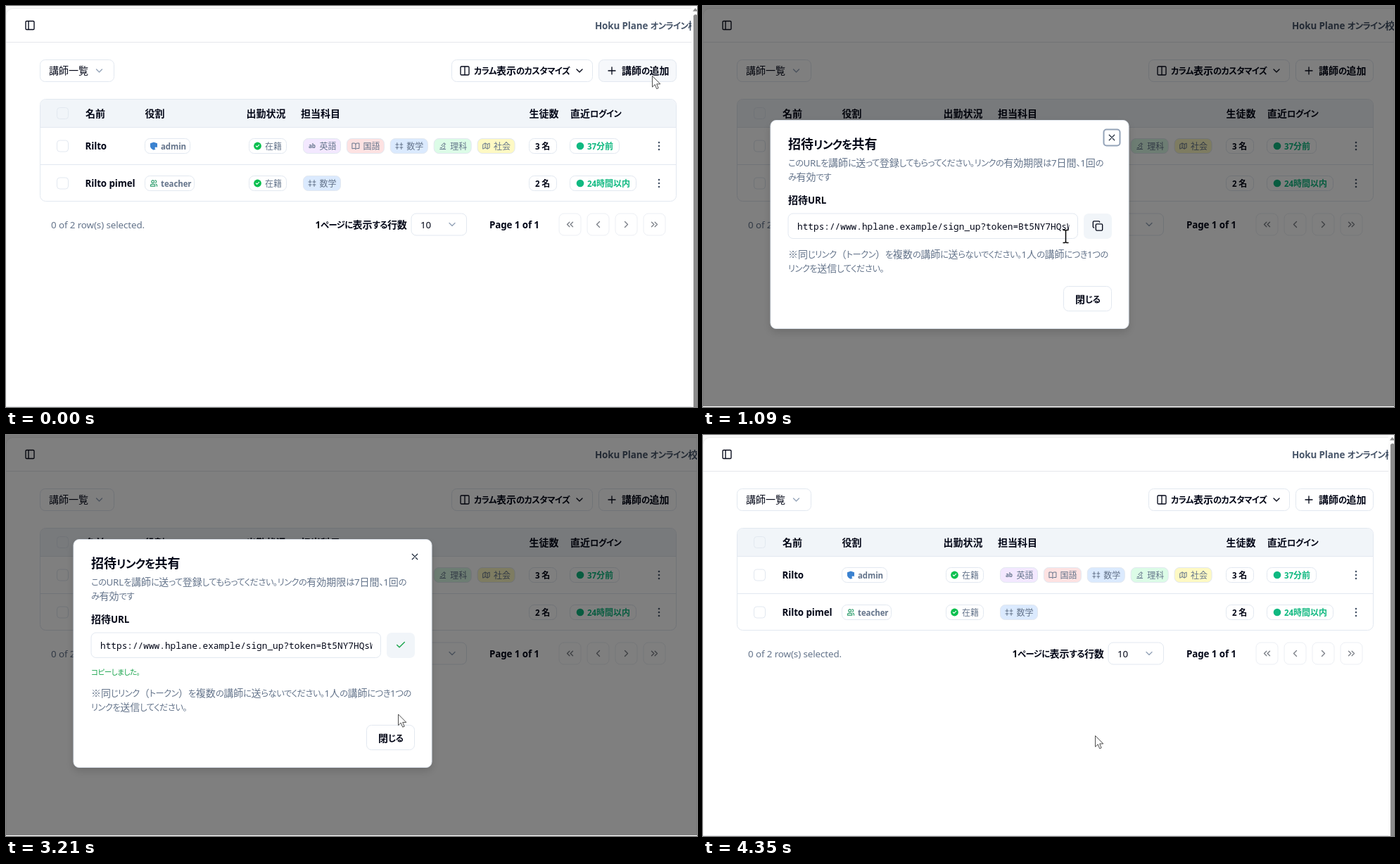
An HTML page for the animation above (4.74 s loop, 982 px wide and 570 px high).

```html
<!DOCTYPE html>
<html lang="ja">
<head>
<meta charset="utf-8">
<title>講師一覧</title>
<style>
html, body { margin: 0; width: 100%; height: 100%; overflow: hidden; background: #fff; }
svg { display: block; width: 100vw; height: 100vh; }
text { font-family: "Noto Sans CJK JP", "Noto Sans CJK", sans-serif; }
.latin { font-family: "Noto Sans", "Open Sans", sans-serif; font-size: .957em; letter-spacing: -.008em; }
.kana { font-size: .88em; font-feature-settings: "palt"; letter-spacing: -.045em; }
.mono { font-family: "Noto Sans Mono", "DejaVu Sans Mono", monospace; font-size: 12.77px; }
</style>
</head>
<body>
<svg id="stage" viewBox="0 0 982 570" xmlns="http://www.w3.org/2000/svg"></svg>
<script>
const LOOP = 4740;
const INK = '#020617', SLATE = '#64748b', LINE = '#e2e8f0', PALE = '#f1f5f9', MINT = '#10b981';

const ICONS = {
  down: 'M6 9l6 6 6-6',
  left: 'M15 18l-6-6 6-6',
  right: 'M9 18l6-6-6-6',
  first: 'M11 17l-5-5 5-5M18 17l-5-5 5-5',
  last: 'M6 17l5-5-5-5M13 17l5-5-5-5',
  plus: 'M4.500 12h15M12 4.500v15',
  cross: 'M18 6L6 18M6 6l12 12',
  check: 'M20 6L9 17l-5-5',
  panel: 'M5 3h14a2 2 0 0 1 2 2v14a2 2 0 0 1-2 2H5a2 2 0 0 1-2-2V5a2 2 0 0 1 2-2zM9 3v18',
  columns: 'M5 3h14a2 2 0 0 1 2 2v14a2 2 0 0 1-2 2H5a2 2 0 0 1-2-2V5a2 2 0 0 1 2-2zM12 3v18',
  copy: 'M10 8h10a2 2 0 0 1 2 2v10a2 2 0 0 1-2 2H10a2 2 0 0 1-2-2V10a2 2 0 0 1 2-2zM4 16a2 2 0 0 1-2-2V4a2 2 0 0 1 2-2h10a2 2 0 0 1 2 2',
  book: 'M12 6v14M2 19V4h6a4 4 0 0 1 4 3 4 4 0 0 1 4-3h6v15h-7l-3 2-3-2z',
  math: 'M2 8h8M6 3v8M14 8h8M18 3v8M2 16h8M6 14v7M14 16h8M18 14v7',
  scope: 'M4 21h16M5 17h5M9 11l3 3 6-6-3-3zM16 3l4 4M13 21a6 6 0 0 0 4-9',
  map: 'M3 7l6-3 6 3 6-3v13l-6 3-6-3-6 3zM9 4v13M15 7v13',
  users: 'M9 3a4 4 0 1 0 .1 0zM2 21v-2a4 4 0 0 1 4-4h6a4 4 0 0 1 4 4v2zM16 3a4 4 0 0 1 0 8M22 21v-2a4 4 0 0 0-3-4'
};

// Latin, kana and kanji runs are set separately, kana narrower
const runs = s => s.match(/[\x20-\x7e]+|[\u3001-\u30ff]+|[^\x20-\x7e\u3001-\u30ff]+/g).map(r =>
  /^[\x20-\x7e]/.test(r) ? `<tspan class="latin">${r}</tspan>` :
  /^[\u3001-\u30ff]/.test(r) ? `<tspan class="kana">${r}</tspan>` : `<tspan>${r}</tspan>`).join('');

const label = (x, y, s, { size = 14, fill = INK, weight = 400, anchor = 'start' } = {}) =>
  `<text x="${x}" y="${y}" font-size="${size}" fill="${fill}" font-weight="${weight}" text-anchor="${anchor}">${runs(s)}</text>`;

const box = (x, y, w, h, r, fill = '#fff', stroke = LINE, sw = 1, extra = '') =>
  `<rect x="${x}" y="${y}" width="${w}" height="${h}" rx="${r}" fill="${fill}" stroke="${stroke}" stroke-width="${sw}" ${extra}/>`;

const dot = (x, y, r, fill, extra = '') => `<circle cx="${x}" cy="${y}" r="${r}" fill="${fill}" ${extra}/>`;

const icon = (name, cx, cy, size = 16, stroke = INK, sw = 2) =>
  `<path d="${ICONS[name]}" transform="translate(${cx - size / 2} ${cy - size / 2}) scale(${size / 24})" ` +
  `fill="none" stroke="${stroke}" stroke-width="${sw}" stroke-linecap="round" stroke-linejoin="round"/>`;

const rule = (y, x1, x2, color = LINE) => `<path d="M${x1} ${y}H${x2}" stroke="${color}"/>`;

const bold = { weight: 600 };
const small = fill => ({ size: 12, weight: 600, fill });

const SUBJECTS = [
  ['英語', '#f3e8ff', ''], ['国語', '#fee2e2', 'book'], ['数学', '#dbeafe', 'math'],
  ['理科', '#dcfce7', 'scope'], ['社会', '#fef9c3', 'map']
];

function subject([name, fill, art], x, cy) {
  const mark = art ? icon(art, x + 13, cy, 12, SLATE, 2)
    : label(x + 13, cy + 3, 'ab', { size: 8.5, weight: 700, fill: SLATE, anchor: 'middle' });
  return box(x + .5, cy - 10.5, 53, 21, 7, fill) + mark +
    label(x + 23.5, cy + 4.5, name, { size: 12, weight: 500, fill: SLATE });
}

function row(cy, name, role, subjects, pupils, login, loginW) {
  const admin = role === 'admin';
  const shield = `<path d="M210 ${cy - 5.5}l5 1.700v4c0 2.500-2 4.500-5 5.500-3-1-5-3-5-5.500v-4z" fill="#3b82d0"/>` + dot(213, cy + 3, 1.5, '#fff');
  return box(72.5, cy - 8, 16, 16, 4) +
    label(112.5, cy + 5, name, bold) +
    box(197.5, cy - 10.5, admin ? 64 : 70, 21, 7) +
    (admin ? shield : icon('users', 210, cy, 11, '#2f9e6e', 2.5)) +
    label(220, cy + 4.5, role, small(SLATE)) +
    box(345.5, cy - 10.5, 53, 21, 7) + dot(357.5, cy, 5.4, '#0ac04f') + icon('check', 357.5, cy, 6.5, '#fff', 4) +
    label(368, cy + 4.5, '在籍', { size: 12, weight: 500, fill: SLATE }) +
    subjects.map((s, i) => subject(s, 422 + i * 61.9, cy)).join('') +
    box(743.5, cy - 10.5, 39, 21, 7) + label(752, cy + 4.5, pupils, small(INK)) +
    box(801.5, cy - 10.5, loginW, 21, 7) + dot(816, cy, 5.3, MINT) + label(826, cy + 4.5, login, small(MINT)) +
    [-5, 0, 5].map(d => dot(928, cy + d, 1.35, '#475569')).join('');
}

const page = () =>
  '<rect width="982" height="570" fill="#f8f8f8"/>' +
  '<path d="M0 570V13a10 10 0 0 1 10-9.500H982V570z" fill="#fff" stroke="#ededed"/>' +
  icon('panel', 34, 27.5) + rule(51.5, 0, 982, '#e5e7eb') +
  label(837, 33, 'Hoku Plane オンライン校', { weight: 600, fill: '#475569' }) +
  box(48.5, 76.5, 105, 31, 7) + label(61, 97, '講師一覧') + icon('down', 132.5, 92, 16, '#94a3b8') +
  box(633.5, 76.5, 200, 31, 7) + icon('columns', 652, 92) + label(665, 97, 'カラム表示のカスタマイズ', bold) + icon('down', 815, 92) +
  box(842.5, 76.5, 110, 31, 7, '#fff', LINE, 1, 'id="add"') + icon('plus', 861, 92) + label(875, 97, '講師の追加', bold) +
  box(48.5, 132.5, 904, 145, 8) +
  `<path d="M49 172V140.500a7.500 7.500 0 0 1 7.500-7.500H944.500a7.500 7.500 0 0 1 7.500 7.500V172z" fill="${PALE}"/>` +
  rule(172.5, 49, 952) + rule(225.5, 49, 952) +
  box(72.5, 144.5, 16, 16, 4, 'none') +
  [[113, '名前'], [197.5, '役割'], [341.5, '出勤状況'], [419, '担当科目'], [743.5, '生徒数'], [802, '直近ログイン']]
    .map(([x, s]) => label(x, 158, s, bold)).join('') +
  row(199, 'Rilto', 'admin', SUBJECTS, '3 名', '37分前', 70) +
  row(252, 'Rilto pimel', 'teacher', [SUBJECTS[2]], '2 名', '24時間以内', 94) +
  label(64, 316, '0 of 2 row(s) selected.', { fill: SLATE }) +
  label(439.5, 316, '1ページに表示する行数', bold) +
  box(576, 295, 78.5, 31, 7) + label(589, 316, '10') + icon('down', 634, 310.5, 16, '#94a3b8') +
  label(687, 316, 'Page 1 of 1', bold) +
  ['first', 'left', 'right', 'last'].map((n, i) =>
    box(786 + i * 40, 295, 31, 31, 7, '#fff', '#eceff4') + icon(n, 801.5 + i * 40, 310.5, 16, '#7c8088')).join('') +
  rule(569.5, 0, 982, '#e5e7eb');

const scrollbar = '<g id="bar"><rect x="974" width="8" height="570" fill="#fcfcfc"/>' +
  '<path d="M977 570V16a3 3 0 0 1 5-3V570z" fill="#8b8b8b"/><path d="M976 7.500l3.500-4.500 2.500 3v1.500z" fill="#8b8b8b"/></g>';

const closeX = y => box(569.5, y - 11.5, 23, 23, 4, 'none', '#94a3b8', 2, 'class="ring"') + icon('cross', 581, y, 15, '#1e293b', 1.9);

const panel = (y, h, id) => box(96, y, 509, h, 8, '#fff', LINE, 1, `id="${id}" filter="url(#shade)"`);

const loading = '<g id="loading">' + panel(191, 239, 'wait') +
  label(121, 231.5, '読み込み中', { size: 18, weight: 600 }) +
  label(121, 257, 'データを読み込んでいます...', { fill: SLATE }) + closeX(216) +
  '<path id="spin" d="M12 0A12 12 0 1 1 3.700-11.400" fill="none" stroke="#020617" stroke-width="2.700" stroke-linecap="round"/>' +
  label(350.5, 363.5, 'Loading...', { size: 16, anchor: 'middle' }) + '</g>';

const invite = '<g id="invite">' + panel(162.5, 296, 'sheet') +
  '<g id="upper">' +
  label(121, 203, '招待リンクを共有', { size: 18, weight: 600 }) + closeX(187) +
  label(121, 228, 'このURLを講師に送って登録してもらってください。リンクの有効期限は7日間、1回の', { fill: SLATE }) +
  label(121, 248, 'み有効です', { fill: SLATE }) +
  label(121, 281, '招待URL', bold) +
  box(121, 295, 411.5, 35.5, 7) +
  '<g clip-path="url(#field)"><text class="mono" x="134" y="318" fill="#020617">https://www.hplane.example/sign_up?token=Bt5NY7HQsW</text></g>' +
  box(541, 295, 40, 36, 7, PALE, 'none') +
  `<g id="copy">${icon('copy', 561, 312.5)}</g><g id="done">${icon('check', 561, 312.5, 16, '#16a34a')}` +
  label(121, 355, 'コピーしました。', { size: 12, weight: 500, fill: '#16a34a' }) + '</g></g>' +
  '<g id="lower">' +
  label(121, 358, '※同じリンク（トークン）を複数の講師に送らないでください。1人の講師につき1つの', { fill: SLATE }) +
  label(121, 378, 'リンクを送信してください。', { fill: SLATE }) +
  box(512.5, 398.5, 68, 35, 7, '#fff', LINE, 1, 'id="shut"') + label(529, 421.5, '閉じる', bold) +
  '</g></g>';

const pointers = dot(0, 0, 12.7, '#fbf01e', 'id="flash" fill-opacity=".78"') +
  '<path id="arrow" d="M.500.500V16.200L4.200 12.700L6.700 18.700L9.200 17.700L6.700 11.900H11.800Z" fill="#fff" stroke="#3a3a3a" stroke-width=".9" stroke-linejoin="round"/>' +
  '<path id="beam" d="M-4-8.500H-1.200L0-7.500L1.200-8.500H4M0-7.500V8.500M-4 9.500H-1.200L0 8.500L1.200 9.500H4" fill="none" stroke="#000" stroke-width="1.500"/>';

const stage = document.getElementById('stage');
stage.innerHTML =
  '<defs><filter id="shade" x="-10%" y="-10%" width="120%" height="130%">' +
  '<feDropShadow dx="0" dy="5" stdDeviation="6" flood-color="#000" flood-opacity=".14"/></filter>' +
  '<clipPath id="field"><rect x="122" y="296" width="398.500" height="34"/></clipPath></defs>' +
  page() + scrollbar +
  '<rect id="veil" width="982" height="569" fill="#000"/><rect id="foot" y="569" width="982" height="1" fill="#fff"/>' +
  `<g id="dialog">${loading}${invite}</g>` + pointers;

const $ = id => document.getElementById(id);
const rings = stage.querySelectorAll('.ring');
const show = (el, on) => el.setAttribute('visibility', on ? 'inherit' : 'hidden');
const set = (id, name, value) => $(id).setAttribute(name, value);
const clamp = v => Math.max(0, Math.min(1, v));

// The picture moves in short bursts: start, end, number of steps
const BURSTS = [[0, 1, 2], [70, 270, 3], [410, 890, 8], [950, 1090, 3], [2020, 2310, 5], [3000, 3410, 7], [3540, 3680, 3], [4080, 4350, 5]];

function snap(t) {
  const [a, b, n] = BURSTS.filter(x => t >= x[0]).pop();
  const hop = (b - a) / (n - 1);
  return a + hop * Math.min(n - 1, Math.floor((t - a) / hop + .08));
}

const TRACK = [
  [0, 918, 99], [70, 917, 97], [690, 917, 97], [760, 890, 125], [820, 812, 205], [890, 701, 273], [950, 612, 304],
  [1020, 545, 320], [1090, 515, 327], [2020, 528.5, 343.5], [2310, 555.5, 324], [3000, 554, 330],
  [3205, 557, 396.5], [3280, 557, 408], [3410, 557, 420], [3540, 557, 422], [3680, 557, 427], [LOOP, 557, 427]
];

function pointerAt(t) {
  const i = TRACK.findIndex((p, k) => k && t <= p[0]);
  const [a, x, y] = TRACK[i - 1], [b, u, v] = TRACK[i];
  const f = (t - a) / (b - a);
  return [x + (u - x) * f, y + (v - y) * f];
}

// 0 closed, 1 open
function openness(s) {
  if (s < 400) return 0;
  if (s < 4080) return 1 - (1 - clamp((s - 395) / 240)) ** 2;
  return 1 - clamp((s - 4148) / 200);
}

function draw(t) {
  const s = snap(t), open = openness(s), copied = t >= 2600;
  const [x, y] = pointerAt(s);
  const beam = s > 1085 && s < 2015;
  const clicked = (t >= 140 && t < 270) || (t >= 2450 && t < 2600) || (t >= 4080 && t < 4210);

  show($('bar'), open === 0);
  show($('foot'), open > 0);
  set('veil', 'opacity', .5 * Math.min(1, open * 1.26));
  set('add', 'fill', t < 410 ? '#f6f8fb' : '#fff');

  const zoom = .95 + .05 * open;
  show($('dialog'), open > 0);
  set('dialog', 'opacity', open);
  set('dialog', 'transform', `translate(350.5 310.5) scale(${zoom}) translate(-350.5 -310.5)`);

  const ready = s > 755;
  show($('loading'), !ready);
  show($('invite'), ready);
  set('spin', 'transform', `translate(350.5 329.5) rotate(${(s - 410) * .36})`);
  rings.forEach(r => r.setAttribute('stroke-opacity', t < 2450 ? 1 : 0));

  const shift = copied ? 14 : 0;
  set('sheet', 'y', 162.5 - shift);
  set('sheet', 'height', 296 + 2 * shift);
  set('upper', 'transform', `translate(0 ${-shift})`);
  set('lower', 'transform', `translate(0 ${shift})`);
  show($('copy'), !copied);
  show($('done'), copied);
  set('shut', 'fill', copied && y >= 412 ? PALE : '#fff');

  show($('flash'), clicked);
  set('flash', 'transform', `translate(${x + .5} ${y + 1})`);
  show($('arrow'), !beam);
  show($('beam'), beam);
  set('arrow', 'transform', `translate(${x} ${y})`);
  set('beam', 'transform', `translate(${x + .5} ${y})`);
}

const begin = performance.now();
function tick() {
  draw((performance.now() - begin) % LOOP);
  requestAnimationFrame(tick);
}
tick();
</script>
</body>
</html>
```
